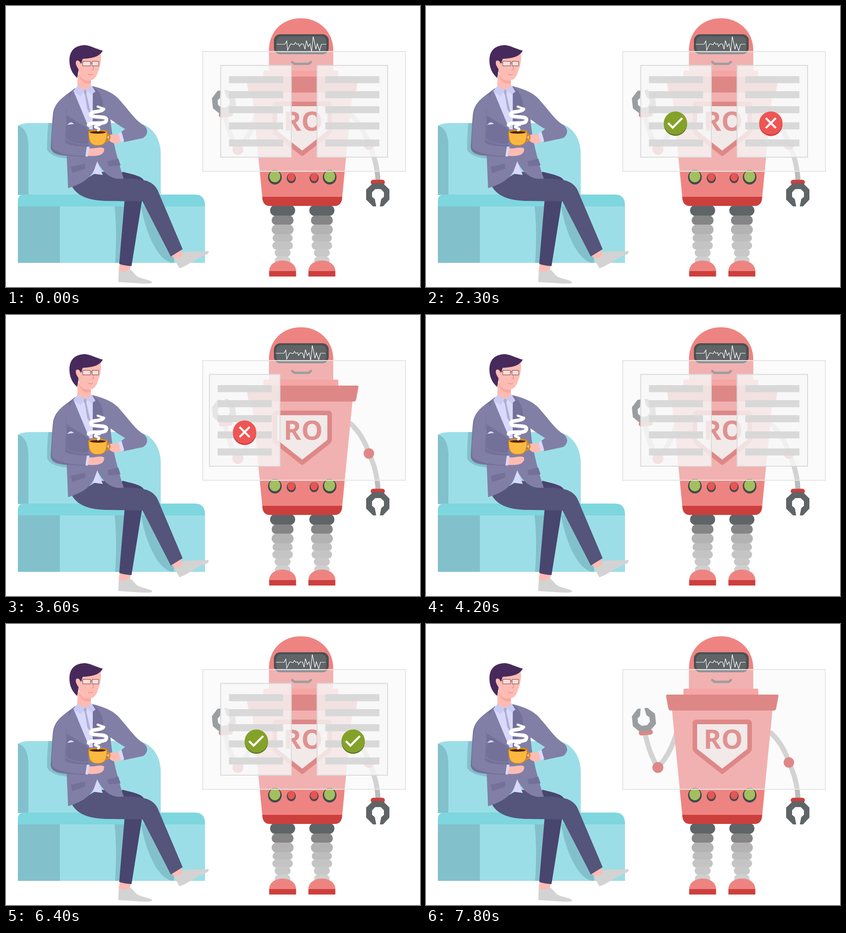
Animation, 907 px wide and 617 px high, one loop 8.3 s. Source, as an HTML page:

```html
<!DOCTYPE html>
<html lang="en">
<head>
<meta charset="utf-8">
<title>Robot review</title>
<style>
  html, body { margin: 0; width: 100%; height: 100%; overflow: hidden; background: #fff; }
  svg { display: block; width: 100vw; height: 100vh; }
  .jacket { fill: #817fa6; } .fold { fill: #737199; }
  .navy { fill: #48456f; } .trouser { fill: #55547b; }
  .skin { fill: #fdbcb3; } .shirt { fill: #d9d9fd; } .shoe { fill: #d3d3d3; }
  .sofa { fill: #9cdee7; } .shade { fill: #82c1cc; }
  .pink { fill: #ee8481; } .red { fill: #cd3f3d; } .steel { fill: #5f6467; }
  .line { fill: none; stroke-linecap: round; stroke-linejoin: round; }
  .arm { stroke: #bcbcbc; stroke-width: 11; stroke-linecap: butt; }
</style>
</head>
<body>
<svg viewBox="0 0 907 617">
  <defs>
    <clipPath id="window"><rect x="431" y="100" width="444" height="263"/></clipPath>
    <path id="claw" class="steel" d="M-4 26H-11L-26 11V-11L-11-25H11L25-11V11L11 26H4L7 10L13 5V-5L6-12H-6L-13-5V5L-7 10Z"/>
    <g id="foot">
      <path class="pink" d="M-29.500 582C-29 566-14 559 0 559S29 566 29.500 582Z"/>
      <path class="red" d="M-29.500 582H29.500V594H-29.500Z"/>
    </g>
    <g id="yes">
      <circle cy="2.500" r="25.500" fill="#5b7322"/><circle r="25.500" fill="#84a229"/>
      <path d="M-16 0L-6 10L15-11" fill="none" stroke="#fff" stroke-width="4.500"/>
    </g>
    <g id="no">
      <circle cy="3" r="25.500" fill="#cd3f3d"/><circle r="25.500" fill="#ee5553"/>
      <path d="M-11-11L11 11M11-11L-11 11" fill="none" stroke="#fff" stroke-width="4.500"/>
    </g>
  </defs>

  <g id="couch">
    <path class="sofa" d="M26 263C32 259 42 257 55 257H290C318 262 339 288 339 325V415H26Z"/>
    <path class="shade" d="M26 263C42 266 49 285 49 308V415H26Z"/>
    <path class="shade" d="M104 257H93C90 280 90 305 90 315C96 328 114 333 134 335L140 300Z"/>
    <path class="sofa" d="M26 440H436V564H26Z"/>
    <path class="shade" d="M26 440H118V564H26ZM238 440H264L250 564H239C242 520 242 480 238 440ZM296 440C305 495 333 564 368 564V545L322 440Z"/>
    <path fill="#7ed6df" d="M26 440V428Q26 414 40 414H414Q436 414 436 438V440Z"/>
  </g>

  <g id="man">
    <path class="skin" d="M249 566L273 570L271 584C260 588 249 584 247 580Z"/>
    <path class="shoe" d="M246 606L247 578C252 585 262 585 269 578C279 580 281 592 292 596C303 600 315 602 320 606C322 609 313 610 300 609.500Z"/>
    <path class="navy" d="M260 424L298 427L275 571C265 571 255 569 248 566Z"/>
    <path class="skin" d="M363 547L384 535L387 545C384 553 374 557 366 552Z"/>
    <path class="shoe" d="M367 553C378 556 386 551 387 541C400 537 420 540 442 538Q447 540 441 545C415 555 400 569 380 576Z"/>
    <path class="trouser" d="M145 397C158 419 185 428 225 428L299 429L361 550L387 534L332 404C325 390 312 384 300 382C280 370 220 362 200 365Z"/>
    <path class="navy" d="M255 364C280 370 298 374 302 383C285 379 265 377 245 381Z"/>
    <path class="jacket" d="M150 181L190 176C222 184 240 194 252 210C272 232 282 250 303 263C313 272 310 284 300 290L258 299L252 277L261 270C248 263 238 255 229 249C231 280 240 325 258 379C237 383 215 372 200 342C192 377 166 391 136 400L133 329C112 328 100 324 98 311C99 285 101 255 103 235C108 208 130 198 150 181Z"/>
    <path class="fold" d="M148 184C136 198 136 216 145 238C158 253 172 263 183 274L180 302C160 305 136 298 131 290C128 303 131 306 178 308L175 331C125 330 100 325 98 311L104 235C108 208 130 198 148 184Z"/>
    <path class="jacket" d="M138 193C118 205 108 214 105 236C102 270 100 290 101 311C110 324 145 329 175 329L178 309C155 308 133 305 130 299C134 275 132 260 133 240L183 272C160 258 140 235 138 193Z"/>
    <path class="fold" d="M133 222C128 250 135 270 130 293C145 303 163 305 181 304V307C158 309 133 306 129 299ZM191 177C208 190 215 207 212 228L190 272ZM142 353L173 346L174 357L145 367ZM222 341L246 335L251 350L225 352Z"/>
    <path class="shirt" d="M134 261Q142 251 149 259ZM149 189L163 180L190 182V271L183 271ZM200 341L190 368L212 371Z"/>
    <path fill="#aeaed0" d="M168 185L173 182L177 186L176 193L187 241L178 226L173 196Z"/>
    <path class="skin" d="M157 148L185 160L187 178L172 184L156 178Z"/>
    <path fill="#fba6a2" d="M158 148C164 160 173 166 186 163V169C172 174 162 164 158 148Z"/>
    <path fill="#cacbf3" d="M147 187L157 175L172 185L164 198L153 191ZM188 175L196 188L188 194L175 184Z"/>
    <path class="skin" d="M153 120C165 106 190 98 207 103C210 117 207 131 201 146C197 160 188 165 179 163C165 159 154 144 153 124Z"/>
    <path fill="#472a5b" d="M139 120C139 96 153 86 174 86C186 87 196 94 212 98C205 111 190 115 168 116L164 128L160 122C152 117 151 128 159 139L156 158C144 148 139 134 139 120Z"/>
    <path class="skin" d="M164 126C158 115 150 119 154 130Q158 137 164 136Z"/>
    <g class="line" stroke="#70424f" stroke-width="1">
      <path d="M162 125L168 124M185 125H189"/>
      <path fill="#fff" fill-opacity=".5" d="M168.500 121.500H185V131.500H168.500ZM189 121.500H203V131.500H189Z"/>
      <path stroke="#d5777c" d="M180 149Q184 153 190 150M191 132L192 139L188 141"/>
    </g>
    <path class="skin" d="M180 312C193 315 207 307 215 313C216 326 205 331 178 329ZM221 288C229 279 240 283 249 281L253 298C240 305 230 303 221 288Z"/>
    <path class="shirt" d="M177 309L183 309L179 331L174 330ZM246 280L253 276L259 297L252 299Z"/>
    <path class="line" stroke="#df8b0e" stroke-width="3.500" d="M220 283C230 280 230 296 219 297"/>
    <path d="M181 276C181 299 186 306 201 306S221 299 221.500 276Z" fill="#fdb840" stroke="#df8b0e" stroke-width="1.500"/>
    <ellipse cx="201" cy="276" rx="21" ry="4.500" fill="#df8b0e"/>
    <ellipse cx="201" cy="277.500" rx="17" ry="2.700" fill="#4a2415"/>
    <g class="line" stroke="#fff">
      <path stroke-width="8" d="M181 261C183 252 219 264 220 250C221 239 184 248 186 237C188 230 207 234 213 227"/>
      <path stroke-width="5" d="M215 226Q209 224 201 221M206 261Q190 264 197 267Q208 269 202 273"/>
    </g>
  </g>

  <g id="robot">
    <g class="line arm">
      <path d="M549 238Q536 285 508 315Q489 285 480 240M753 237Q782 262 795 304Q813 340 815 384"/>
    </g>
    <g class="red">
      <circle cx="508" cy="315" r="12"/><circle cx="795" cy="304" r="11.500"/>
      <rect x="466" y="233" width="31" height="11" rx="5.500" transform="rotate(-5 481 238)"/>
      <rect x="799" y="381.500" width="31" height="11" rx="5.500"/>
    </g>
    <use href="#claw" transform="translate(477 211) rotate(174)"/>
    <use href="#claw" transform="translate(815 414)"/>
    <g id="legs"></g>
    <path class="pink" d="M576 145V98C576 56 605 27 646 27S717 57 717 98V145Z"/>
    <rect x="564" y="142" width="164" height="20" rx="3" fill="#f4716e"/>
    <path class="pink" d="M538 180L561.500 420Q563 439 578 439H720Q735 439 736.500 420L760 180Z"/>
    <path class="red" d="M561.500 419H736.500Q736 439 720 439H578Q562 439 561.500 419Z"/>
    <path class="red" d="M529 155H769Q773 155 772 159L767 186Q766 190 762 190H536Q532 190 531 186L526 159Q525 155 529 155Z"/>
    <path d="M592 215H706Q709 215 709 218V273Q709 276 706 279L649 324L592 279Q589 276 589 273V218Q589 215 592 215Z" fill="#f0e1e1" stroke="#cd3f3d" stroke-width="10" stroke-linejoin="round"/>
    <text x="651" y="274" text-anchor="middle" font-family="'Open Sans', 'Noto Sans', sans-serif" font-weight="700" font-size="59" fill="#d0504d">RO</text>
    <rect x="587" y="62" width="120" height="44" rx="14" fill="#4a5053"/>
    <rect class="steel" x="592" y="66.500" width="110" height="36" rx="10"/>
    <path id="pulse" fill="none" stroke="#fff" stroke-width="1.200" d="M591 84H609L613 77L615 97L619 88L622 83L629 85L632 80L635 84L639 83L641 89L645 83L650 84L653 95L656 76L660 89L664 83L667.500 100L671 67L677 95L680 83L685 98L689 84H700"/>
    <path class="line" stroke="#5f6467" stroke-width="5" stroke-linecap="butt" d="M627 123L632 127H663L668 123"/>
    <g id="buttons"></g>
  </g>

  <rect x="431" y="100" width="444" height="263" fill="#f5f5f5" fill-opacity=".4" stroke="#e5e5e5" stroke-width="2"/>
  <g clip-path="url(#window)">
    <g id="cards">
      <g id="sheets"></g>
      <g id="badges"><use id="leftBadge" href="#yes"/><use id="rightBadge" href="#no"/></g>
    </g>
  </g>
</svg>
<script>
const byId = id => document.getElementById(id);
const shift = (node, x, y = 0) => node.setAttribute('transform', `translate(${x} ${y})`);

// Leg rings: top, height, width, colour
const rings = [[437, 24, 55, '#5f6467'], [460, 21, 48, '#858585'], [480, 22, 48, '#b3b3b3'],
  [501, 17, 44, '#bdbdbd'], [517, 18, 45, '#c4c4c4'], [533, 18, 35, '#c8c8c8'], [550, 18, 34, '#cfcfcf']];
byId('legs').innerHTML = [606, 692].map(x => `<g transform="translate(${x})">` +
  rings.map(([y, h, w, color]) =>
    `<rect x="${-w / 2}" y="${y}" width="${w}" height="${h}" rx="${h / 2}" fill="${color}"/>`).join('') +
  '<use href="#foot"/></g>').join('');

const green = { rx: 12, ry: 13, rim: 3, y: 374, off: '#a3bf5f', on: '#c6f04a' };
const red = { rx: 8, ry: 9, rim: 2, y: 376, off: '#e85553', on: '#ff3b38' };
const buttons = [[589, green], [625, red], [675, red], [709, green]];
byId('buttons').innerHTML = buttons.map(([x, b]) =>
  `<ellipse cx="${x}" cy="${b.y + 2}" rx="${b.rx + b.rim}" ry="${b.ry + b.rim}" fill="#434a4d"/>
   <ellipse class="lamp" cx="${x}" cy="${b.y}" rx="${b.rx}" ry="${b.ry}"/>`).join('');
const lamps = document.querySelectorAll('.lamp');

byId('sheets').innerHTML = [0, 211].map(x => `<g transform="translate(${x})">
  <rect x="470.500" y="130.500" width="154.500" height="201.500" fill="#f8f8f8" fill-opacity=".8" stroke="#dadada" stroke-width="2"/>` +
  [154, 187, 220, 255.5, 293].map(y =>
    `<rect x="488.500" y="${y}" width="118.500" height="15.500" fill="#d8d8d8" fill-opacity=".93"/>`).join('') +
  '</g>').join('');

const LOOP = 8300, SECOND_ROUND = 4200, ROUND_OFFSET = 4100;

function render(time) {
  const second = time >= SECOND_ROUND;
  const t = second ? time - ROUND_OFFSET : time;

  const jolt = t < 900 && Math.floor(t / 100) % 2 === 0;
  shift(byId('pulse'), jolt ? 2 : 0);

  const fade = Math.floor((t - 1000) / 100) / 3;
  byId('badges').setAttribute('opacity', Math.min(1, Math.max(0, fade)));
  const settled = t >= 3300;
  shift(byId('leftBadge'), second && !settled ? 548.5 : 546.5, 257);
  shift(byId('rightBadge'), settled ? 758.5 : second ? 760.5 : 755.5, 257);
  byId('rightBadge').setAttribute('href', second ? '#yes' : '#no');

  const lit = t >= 1100 && t < 2300 ? [0, second ? 3 : 2] : [];
  lamps.forEach((lamp, i) => lamp.setAttribute('fill', buttons[i][1][lit.includes(i) ? 'on' : 'off']));

  const slide = Math.max(0, Math.floor((t - 3480) / 20)) * 39.3;
  shift(byId('cards'), -slide);
  byId('cards').style.display = t >= 3700 ? 'none' : '';
}

const start = performance.now();
function tick() {
  render((performance.now() - start) % LOOP);
  requestAnimationFrame(tick);
}
tick();
</script>
</body>
</html>
```
